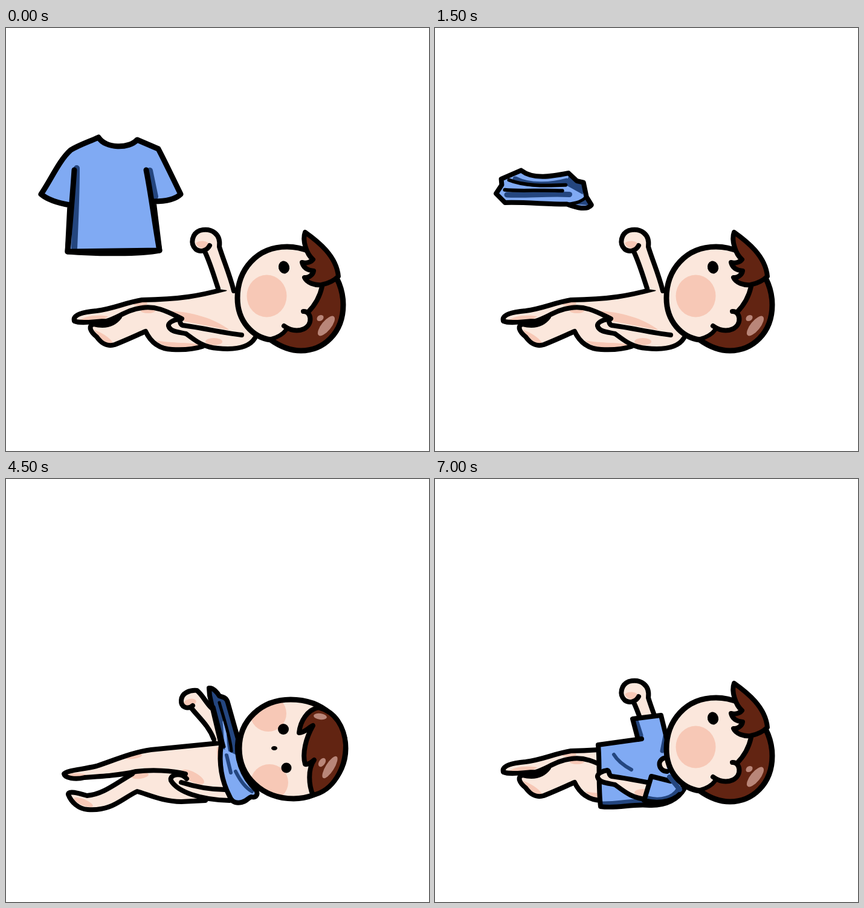
These frames come from a looping animation (700 by 700 pixels, 8 s). An HTML page with a canvas:

```html
<!DOCTYPE html>
<html lang="en">
<head>
<meta charset="utf-8">
<title>Getting dressed</title>
<style>
html, body { margin: 0; width: 100%; height: 100%; overflow: hidden; background: #fff; }
canvas { display: block; width: 100vw; height: 100vh; }
</style>
</head>
<body>
<canvas id="stage" width="700" height="700"></canvas>
<script>
const ctx = document.getElementById('stage').getContext('2d');
const INK = '#000', SKIN = '#fbe7dc', BLUSH = '#f7c8b6', HAIR = '#622412';
const GLOSS = '#b98679', BLUE = '#80aaf3', NAVY = '#24467f';
const STEP = 500;

function fill(d, color) {
  ctx.fillStyle = color;
  ctx.fill(new Path2D(d));
}
function line(d, width = 8, color = INK) {
  ctx.strokeStyle = color;
  ctx.lineWidth = width;
  ctx.stroke(new Path2D(d));
}
function shape(d, color, width = 8) {
  fill(d, color);
  line(d, width);
}
function oval(x, y, rx, ry, color, degrees = 0) {
  ctx.beginPath();
  ctx.ellipse(x, y, rx, ry, degrees * Math.PI / 180, 0, 7);
  ctx.fillStyle = color;
  ctx.fill();
}
// Redraws a part around its centre (cx, cy), moved to (x, y) and turned.
function placed(part, cx, cy, x, y, degrees) {
  ctx.save();
  ctx.translate(x, y);
  ctx.rotate(degrees * Math.PI / 180);
  ctx.translate(-cx, -cy);
  part();
  ctx.restore();
}

// Shirt shapes
function flatShirt() {
  const outline = 'M153 181C165 200 204 200 217 185L252 200C261 217 275 246 289 275C280 284 265 287 244 287L254 368C225 374 150 374 102 370L106 293C88 290 70 285 58 275C75 250 88 219 107 202C122 193 138 188 153 181Z';
  fill(outline, BLUE);
  line('M117 232C117 275 115 320 113 364', 10, NAVY);
  line('M238 236L247 279', 10, NAVY);
  line(outline, 9);
  line('M113 235C110 280 106 325 102 370L254 368C246 325 241 280 232 235', 9);
}
function looseRoll() {
  const outline = 'M527 307L544 305L551 298L583 314C584 340 609 360 630 377L629 396L634 406L619 425L614 440C602 440 595 425 589 408C570 386 545 350 525 328Z';
  fill(outline, BLUE);
  line('M537 322C557 348 580 370 604 401', 9, NAVY);
  line('M566 316C572 342 596 368 618 383', 9, NAVY);
  fill('M612 386L630 379L633 408L618 418ZM590 408L618 428L613 440Z', NAVY);
  line('M541 314C554 334 582 362 601 388', 6);
  line('M558 309C566 334 588 360 612 386', 6);
  line('M589 408C602 421 609 424 619 425', 5);
  line(outline, 8);
}
function tightRoll() {
  const outline = 'M449 354L458 350L467 355L476 349L484 354C486 385 477 425 478 465L475 530L462 537L453 531L443 541L432 533C443 510 433 480 437 440C437 413 446 395 447 378Z';
  fill(outline, BLUE);
  fill('M449 384C440 408 446 430 444 460L441 530L434 533C442 500 434 465 437 430ZM474 357L483 354L475 530L466 533C464 475 471 440 469 405ZM443 500L476 492L475 530L462 537L443 541Z', NAVY);
  line('M470 369C471 410 462 440 464 462', 5);
  line('M459 402C454 440 455 475 456 504', 5);
  line(outline, 8);
}
function neckRoll() {
  const outline = 'M336 346C343 345 350 354 353 359C360 361 365 362 367 370L384 430C379 460 390 492 414 515C418 523 413 528 406 526C401 527 399 533 390 535C377 538 372 531 370 525C357 500 352 470 356 440C350 413 342 382 337 358Z';
  fill(outline, BLUE);
  fill('M338 348L365 366L384 430L380 456L358 446C354 414 345 382 338 348Z', NAVY);
  line('M365 457L372 486M380 484C389 502 398 512 407 517', 6, NAVY);
  line('M361 402C364 430 362 440 366 452', 5, BLUE);
  line('M353 370C360 395 372 430 373 450M344 377L361 443', 5);
  line(outline, 8);
}
function oneSleeve() {
  const outline = 'M327 389L374 375L388 403C386 430 388 447 395 468C400 491 412 514 423 530C420 536 408 527 403 527C402 536 393 540 389 536C376 515 366 488 349 465C340 450 331 443 329 432L337 429Z';
  fill(outline, BLUE);
  line('M333 395L343 424M376 382L386 407M362 434L367 449', 7, NAVY);
  line('M378 490L394 527M376 472C386 491 397 506 405 519', 8, NAVY);
  line(outline, 8);
  line('M329 434C337 434 345 430 350 425', 8);
}
// Shirt seen from the front, pulled down as far as x = hem.
function frontShirt(hem) {
  const outline = `M311 379L335 357L367 384L386 430C383 460 393 495 410 514C402 525 388 530 372 530L${hem + 4} 530C${hem - 3} 500 ${hem} 465 ${hem + 2} 441L345 433Z`;
  fill(outline, BLUE);
  line('M321 382L349 427M383 444C380 470 389 494 402 512', 7, NAVY);
  line(`M${hem + 12} 455L${hem + 22} 476`, 6, NAVY);
  line(outline, 8);
}

// Side view
function sideBody() {
  fill('M388 432L362 432C320 443 290 449 225 450C195 455 180 464 150 468C128 470 110 474 113 485C125 490 150 485 166 486L145 490C135 493 140 503 150 510C158 522 167 527 178 524L231 502C238 517 250 531 275 532C295 533 310 532 325 527L412 513Z', SKIN);
  fill('M119 485C133 476 148 474 169 477C160 486 133 488 119 485ZM145 499C158 504 172 512 177 521C164 526 153 510 145 499ZM248 517C275 522 305 520 322 524C297 533 265 532 248 517Z', BLUSH);
  oval(222, 456, 12, 4, BLUSH);
  oval(235, 468, 12, 4, BLUSH);
  fill('M266 468C305 469 345 480 370 500L292 485Z', BLUSH);
  line('M362 432C320 443 290 449 225 450C195 455 180 464 150 468C128 470 110 474 113 485C125 490 148 485 166 485C185 480 200 466 225 463C250 459 270 471 291 481');
  line('M188 478C178 491 165 495 145 490C135 493 140 503 150 511C158 522 167 528 180 524C198 517 215 509 231 502C238 517 250 531 275 532C295 533 310 532 325 527');
}
function raisedArm() {
  fill('M352 432L331 370C322 374 311 368 308 356C305 340 320 333 332 334C348 335 355 347 353 362L380 436Z', SKIN);
  fill('M314 356C321 350 333 352 337 358C331 367 319 367 314 356Z', BLUSH);
  line('M337 360C333 368 322 372 314 366C304 357 308 340 321 335C340 330 356 341 353 362C360 385 370 407 377 435');
  line('M329 370C338 389 344 410 351 431');
}
function nearArm() {
  fill('M291 492C325 499 355 504 390 508L412 513C403 528 382 532 350 530C319 525 309 509 292 505C270 504 263 488 275 484L288 482Z', SKIN);
  oval(344, 519, 14, 6, BLUSH);
  line('M390 508C355 504 325 496 292 492C286 489 290 484 285 482C277 483 268 488 269 493C272 503 285 503 298 506C311 515 324 528 350 530C380 533 403 528 412 513');
}
function sideHead() {
  const skull = 'M383 447C383 400 415 362 465 362C520 362 558 410 558 458C558 505 525 534 488 534C470 534 455 528 438 516C408 512 383 485 383 447Z';
  fill(skull, SKIN);
  oval(431.5, 443.5, 33, 35, BLUSH);
  oval(460, 396, 9, 10.5, INK, -15);
  fill('M550 412C562 440 562 480 545 505C525 538 470 544 438 516C448 512 458 508 465 499C490 502 505 495 503 480L501 470C513 458 521 445 523 427Z', HAIR);
  oval(520, 480, 6, 4.5, GLOSS, -35);
  oval(530, 493, 20, 8, GLOSS, -51);
  line(skull, 9);
  line('M523 428C519 446 511 459 500 470');
  shape('M492 469C505 468 509 490 493 498C479 504 467 498 460 493', SKIN);
  line('M438 515C449 512 459 506 464 499', 7);
  shape('M495 338C516 353 547 377 550 411C542 419 532 423 522 425C511 426 498 422 494 413C501 414 508 408 509 402C500 401 492 397 490 388C498 390 505 387 508 383C497 374 490 351 495 338Z', HAIR);
}
function wornShirt() {
  const outline = 'M327 397L374 391L384 432L412 513C403 530 382 541 355 540C326 537 302 546 274 542C270 509 273 471 270 440L342 430L336 431Z';
  fill(outline, BLUE);
  line('M334 402L341 424M381 425L376 450M276 537C303 538 330 530 350 534C377 536 396 530 408 517', 7, NAVY);
  line('M296 456C303 468 314 475 325 481', 6, NAVY);
  line(outline);
}
function nearSleeve() {
  const outline = 'M358 492L390 500L412 513C401 532 374 540 346 532Z';
  fill(outline, BLUE);
  line('M352 528C374 534 394 527 402 514', 7, NAVY);
  line('M390 500L358 492L346 532C374 539 401 532 412 513');
  line('M388 493L405 514', 8, NAVY);
  shape('M383 461C366 463 369 483 384 484', SKIN);
}
function side(overlay) {
  sideBody();
  nearArm();
  raisedArm();
  sideHead();
  if (overlay) overlay();
}
function dressedSide() {
  sideBody();
  raisedArm();
  wornShirt();
  nearArm();
  nearSleeve();
  sideHead();
}

// Front view; the feet reach further left by "reach".
function frontBody(reach) {
  const x = n => n - reach;
  const upper = `M390 434L352 437L240 448C210 452 180 465 ${x(150)} 475C${x(125)} 481 ${x(100)} 482 ${x(96)} 488C${x(97)} 495 ${x(115)} 498 ${x(130)} 494C160 492 190 490 215 484C240 481 275 482 297 488`;
  const lower = `M209 488C180 505 160 522 ${x(134)} 524C${x(120)} 520 ${x(103)} 515 ${x(103)} 522C${x(108)} 535 ${x(120)} 546 ${x(135)} 547C175 550 190 530 217 517C235 522 260 534 290 534L330 532`;
  fill(lower + 'L385 530L385 470L230 470Z', SKIN);
  fill(upper + 'L390 510Z', SKIN);
  oval(x(116), 490, 16, 3, BLUSH);
  oval(x(128), 535, 17, 5, BLUSH, 22);
  oval(211, 459, 14, 4, BLUSH, -8);
  oval(222, 491, 14, 5, BLUSH, -8);
  oval(309, 493, 21, 8, BLUSH, 28);
  fill('M349 444C349 465 353 489 360 508L370 508L360 440Z', BLUSH);
  line(upper);
  line(lower);
}
function frontRaisedArm() {
  fill('M303 378C286 382 284 359 300 352C310 348 320 349 325 357C335 371 346 383 352 400L355 436L345 432C335 407 318 395 303 378Z', SKIN);
  oval(304, 370, 11, 6, BLUSH, -15);
  line('M309 375C301 382 289 378 290 366C291 354 304 349 316 350C325 357 330 369 340 379');
  line('M306 378C318 394 335 407 344 431');
}
function frontNearArm() {
  fill('M300 497C290 487 268 487 275 500C286 517 320 531 370 532L368 513C330 512 306 507 294 498Z', SKIN);
  line('M299 496C289 485 270 489 273 499C284 518 322 531 370 532');
  line('M290 502C309 508 333 514 362 514');
}
function frontHead() {
  const skull = 'M386 446C386 399 423 365 471 365C523 365 562 399 562 446C562 493 523 529 476 529C424 529 386 492 386 446Z';
  ctx.save();
  ctx.clip(new Path2D(skull));
  fill(skull, SKIN);
  oval(434, 388, 30, 30, BLUSH);
  oval(436, 502, 31, 30, BLUSH);
  ctx.restore();
  oval(459, 414, 9, 9, INK);
  oval(464, 478, 8.5, 8.5, INK);
  oval(444, 445.5, 5, 3.5, INK);
  line(skull, 9);
  shape('M517 378C499 382 487 400 485 420C494 420 501 411 508 408C496 429 490 454 495 472C502 473 506 468 510 465C499 480 501 507 508 523C541 516 562 480 562 440C560 410 545 385 517 378Z', HAIR);
  oval(520, 393, 11, 5, GLOSS, 8);
  oval(523, 469, 8, 5, GLOSS, -55);
  oval(536, 477, 21, 7, GLOSS, -58);
}
function front(reach, shirt, armOverShirt = false) {
  frontBody(reach);
  frontRaisedArm();
  if (!armOverShirt) frontNearArm();
  frontHead();
  shirt();
  if (armOverShirt) frontNearArm();
}

const spread = () => side(flatShirt);
const bunched = () => side(() => placed(looseRoll, 579, 369, 182, 274, -50));
const dressed = dressedSide;
const scenes = [
  spread, bunched, spread, bunched, bunched,
  () => side(looseRoll),
  () => side(() => placed(tightRoll, 459, 446, 514, 446, 19)),
  () => side(tightRoll),
  () => side(() => placed(tightRoll, 459, 446, 408, 454, -18)),
  () => front(0, neckRoll),
  () => front(0, () => frontShirt(350)),
  () => side(oneSleeve),
  () => front(18, () => frontShirt(340), true),
  () => front(18, () => frontShirt(291), true),
  dressed, dressed
];

let shown = -1;
ctx.lineCap = ctx.lineJoin = 'round';
function tick() {
  const index = Math.floor(performance.now() / STEP) % scenes.length;
  if (index !== shown) {
    shown = index;
    ctx.fillStyle = '#fff';
    ctx.fillRect(0, 0, 700, 700);
    scenes[index]();
  }
  requestAnimationFrame(tick);
}
tick();
</script>
</body>
</html>
```
